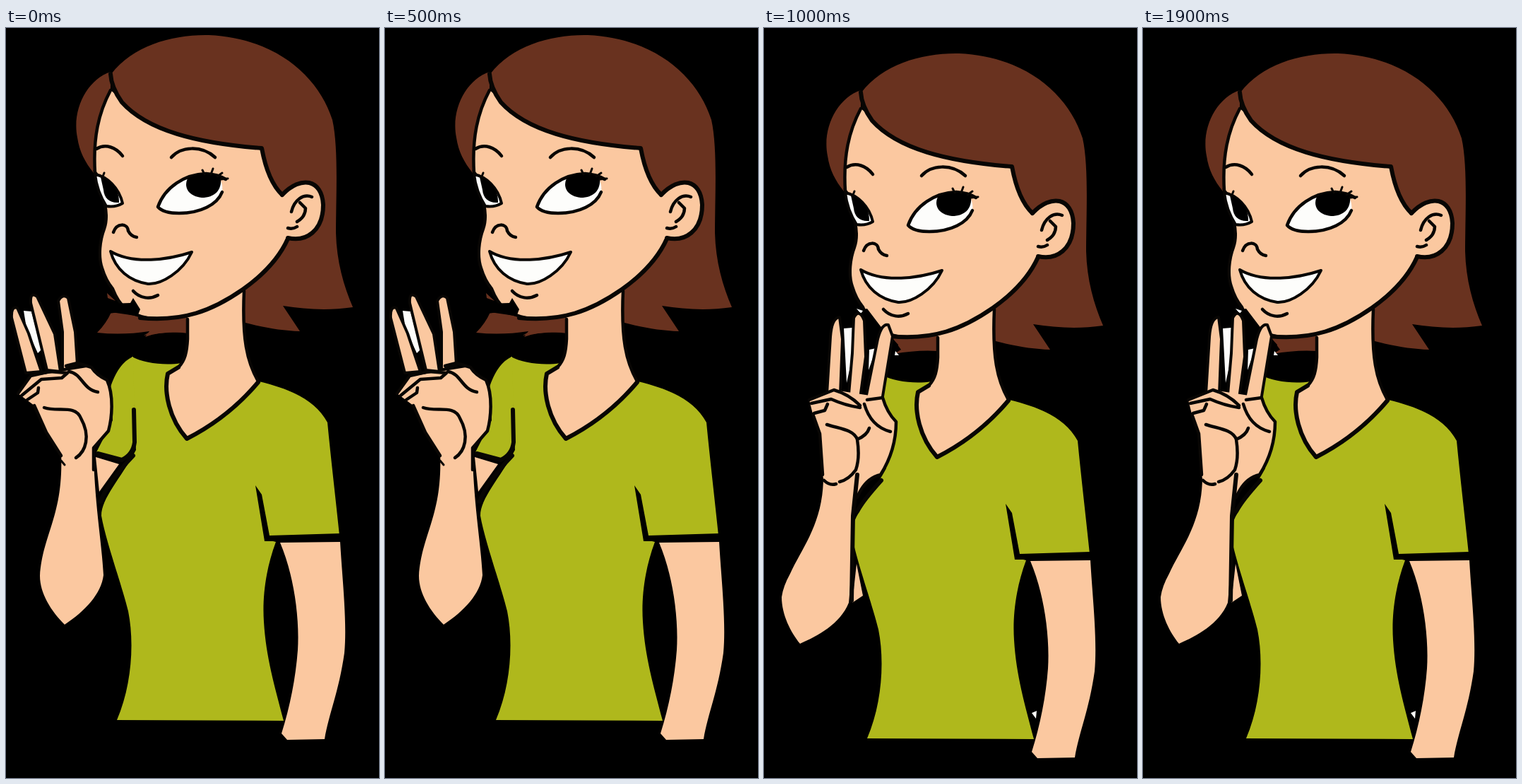
Recreate the animation shown at these times as an HTML page. Size 528 px wide and 1061 px high, loop 2 s.

```html
<!DOCTYPE html>
<html lang="en">
<head>
<meta charset="utf-8">
<title>Waving woman</title>
<style>
  html, body { margin: 0; width: 100%; height: 100%; overflow: hidden; background: #000; }
  svg { display: block; width: 100vw; height: 100vh; }
  .hair { fill: #69321f; }
  .skin { fill: #fbc8a0; }
  .shirt { fill: #afb81c; }
  .white { fill: #fdfdfb; }
  .edge { stroke: #080604; stroke-width: 4; }
  .line { fill: none; stroke: #080604; stroke-width: 4.5; }
  .thin { stroke-width: 3; }
  .bold { stroke-width: 6; }
  .woman { animation: shift 2s step-end infinite; }
  .out { animation: first 2s step-end infinite; }
  .in { animation: second 2s step-end infinite; }
  @keyframes shift { 0% { transform: none; } 50%, 100% { transform: translate(-11px, 26px); } }
  @keyframes first { 0% { visibility: visible; } 50%, 100% { visibility: hidden; } }
  @keyframes second { 0% { visibility: hidden; } 50%, 100% { visibility: visible; } }
</style>
</head>
<body>
<svg viewBox="0 0 528 1061" preserveAspectRatio="none" stroke-linecap="round" stroke-linejoin="round">
  <g class="woman">
    <!-- hair behind the head -->
    <path class="hair" d="M149 65C180 25 235 9 287 10C380 14 442 67 462 130C471 170 467 240 467 290C468 330 478 365 491 395C455 400 425 398 392 393L416 429C390 428 365 424 335 416L300 300L160 120Z"/>
    <path class="hair" d="M191 410L258 405V431Q228 429 195 435L205 429Z"/>
    <path class="hair out" d="M129 431Q142 418 149 402L190 408L258 410V432Q225 427 197 437L203 429Q165 435 129 431ZM143 375L155 386L144 382Z"/>
    <path class="hair" d="M148 62C115 73 93 115 101 155C104 175 112 190 124 205L148 88Z"/>

    <!-- shirt -->
    <path class="shirt" d="M178 465C195 474 225 478 248 474L256 582Q315 551 358 500C400 510 437 525 455 558C460 610 466 660 472 718L370 724L382 727C366 770 363 810 365 840C368 890 380 930 393 980L157 979C178 930 182 870 173 825C163 785 141 725 135 690C135 665 162 638 184 597Z"/>
    <g class="out">
      <path class="shirt" d="M180 465C165 471 155 487 148 508L151 555L128 600L166 611L183 590Z"/>
      <path class="skin" d="M127 607L160 617L132 656Z"/>
      <path class="line bold" d="M130 602L164 611Q180 603 182 586L181 540M180 605Q142 645 134 670"/>
    </g>
    <path d="M353 647L362 660L373 718L473 715V726L366 726Z"/>
    <path class="skin" d="M388 728L473 727C476 780 483 840 479 884C471 940 457 970 451 1006L398 1007L390 998C402 960 410 920 413 880C416 830 406 770 388 728Z"/>

    <!-- neck -->
    <path class="skin" d="M257 402V440C256 465 248 479 230 490C222 515 231 553 256 581Q315 551 357 501C341 472 334 440 337 365Z"/>
    <path class="line" d="M257 412V440C256 460 253 470 245 479M337 372C334 440 341 472 357 500"/>
    <path class="line bold" d="M244 480L229 489C223 515 231 553 256 581Q315 551 357 501"/>

    <!-- face and ear -->
    <path class="skin" d="M148 88C131 120 123 155 126 205L140 250Q144 270 139 284C133 300 130 323 136 340Q141 357 151 369C160 392 172 405 203 411C250 414 292 400 335 370C366 348 387 325 399 298C425 303 449 287 449 250C447 214 418 208 391 236C375 221 367 197 362 170C270 163 200 145 164 105Q154 92 148 88Z"/>
    <path class="line" d="M126 205C123 155 131 120 148 88M126 205L140 250Q144 270 139 284C133 300 130 323 136 340Q141 357 151 369C160 392 172 405 203 411"/>
    <path class="line bold" d="M148 65Q149 84 164 105C200 145 270 163 362 170C367 197 375 221 391 236"/>
    <path class="line bold" d="M190 410C250 416 292 400 335 370C366 348 387 325 399 298"/>
    <path class="line bold" d="M391 236C418 208 447 214 449 250C449 287 425 303 399 297"/>
    <path class="line" d="M404 260C408 243 421 234 433 239M416 247L424 255Q424 267 412 274M399 283Q406 285 412 281"/>
    <path class="out" d="M110 392L137 384L146 390L176 389L180 382L190 398L186 408L160 402L131 406L150 396Z"/>

    <!-- features -->
    <path class="line" d="M128 171C141 163 156 169 165 181M234 183C247 168 276 165 296 183"/>
    <path class="white" d="M215 253C225 225 253 207 283 206C300 207 308 215 306 232C299 250 275 262 245 262C230 262 220 259 215 253Z"/>
    <path class="line" d="M306 232C299 250 275 262 245 262C230 262 220 259 215 253C225 225 253 207 283 206Q300 207 311 214"/>
    <path d="M257 213Q281 199 304 211C306 230 295 240 277 240C259 238 251 226 257 213Z"/>
    <path class="line thin" d="M281 207L278 201M290 207L293 199M299 210L306 205M304 214L314 213"/>
    <path class="white edge" d="M126 207C143 210 160 226 165 248Q155 254 142 252C133 238 128 225 126 207Z"/>
    <path d="M134 211C149 214 161 230 160 247C147 248 139 241 138 229Z"/>
    <path class="line thin" d="M130 208L125 202M137 210L139 205"/>
    <path class="line" d="M152 289C157 275 172 276 173 287Q177 295 185 296M180 372C190 383 204 384 215 378"/>
    <path class="white edge" d="M148 316C180 335 230 328 263 317C250 345 220 363 201 362C175 358 155 342 148 316Z"/>
  </g>

  <!-- hand held away -->
  <g class="out">
    <path class="white" d="M25 400L36 401L50 455L45 460L29 425Z"/>
    <path class="skin edge" d="M28 488L8 410Q7 393 16 396L32 432L50 486ZM58 484L35 389Q34 372 44 380L69 433L77 486ZM80 484L80 430L74 386Q80 375 88 382L98 430L101 477Z"/>
    <path class="skin" d="M78 600C82 690 52 715 48 775C48 800 64 825 83 844C112 825 135 800 138 774C136 730 124 665 124 592Z"/>
    <path class="skin" d="M17 517L35 493L90 484L121 479Q128 491 143 498C153 520 150 552 145 570Q138 583 122 596L104 610L78 605Q70 590 57 573L40 534Z"/>
    <path class="line" d="M17 517L35 492L62 486L87 488L79 495L50 497L22 520M30 526L45 516L46 509M40 534L57 572L78 605"/>
    <path class="line" d="M54 537C73 544 98 532 106 552C120 577 113 599 99 608M89 486C108 489 108 511 130 515M85 478L101 474L121 480Q128 491 143 498C153 520 150 552 145 570L124 594V625"/>
    <path class="line thin" d="M78 612L83 618"/>
  </g>

  <!-- hand held at the chin -->
  <g class="in">
    <path d="M130 400L146 397L165 422L190 448L184 468L168 492L145 485Z"/>
    <path class="white" d="M113 425L125 424L124 470L117 502ZM149 455L159 453L148 484ZM131 397L140 400L137 404ZM186 457L191 463H185ZM379 969L386 966L385 977Z"/>
    <path class="skin" d="M131 758L140 803L125 813Z"/>
    <path class="skin edge" d="M89 518L94 437Q96 410 107 409L111 440L108 518ZM120 518L125 460L127 410Q135 396 142 414L144 465L136 524ZM144 524L161 440Q167 417 176 420L182 436L167 527Z"/>
    <path class="skin" d="M84 635C84 700 54 735 37 772Q27 790 25 805C25 830 38 855 51 871C76 860 108 843 120 813C125 770 123 710 130 630Z"/>
    <path class="skin" d="M64 526L99 512L150 520L168 523Q174 544 187 557C187 585 179 610 165 632Q144 638 132 665L128 640L85 642Q79 615 79 574L69 546Z"/>
    <path class="line" d="M64 526L99 512Q120 518 136 534M67 531L95 525Q115 534 136 537M71 545L86 541L90 532M69 546L79 574L83 632"/>
    <path class="line" d="M89 561C107 567 127 568 132 582Q146 576 149 566M132 582Q136 608 130 625Q120 639 107 642M85 640Q93 648 102 645M142 532C148 553 160 566 179 571M146 526L168 523Q174 544 187 557C187 585 179 610 165 632Q143 637 132 664"/>
    <path class="line bold" d="M132 632L126 690L124 810M166 640Q139 670 132 684"/>
  </g>
</svg>
</body>
</html>
```
